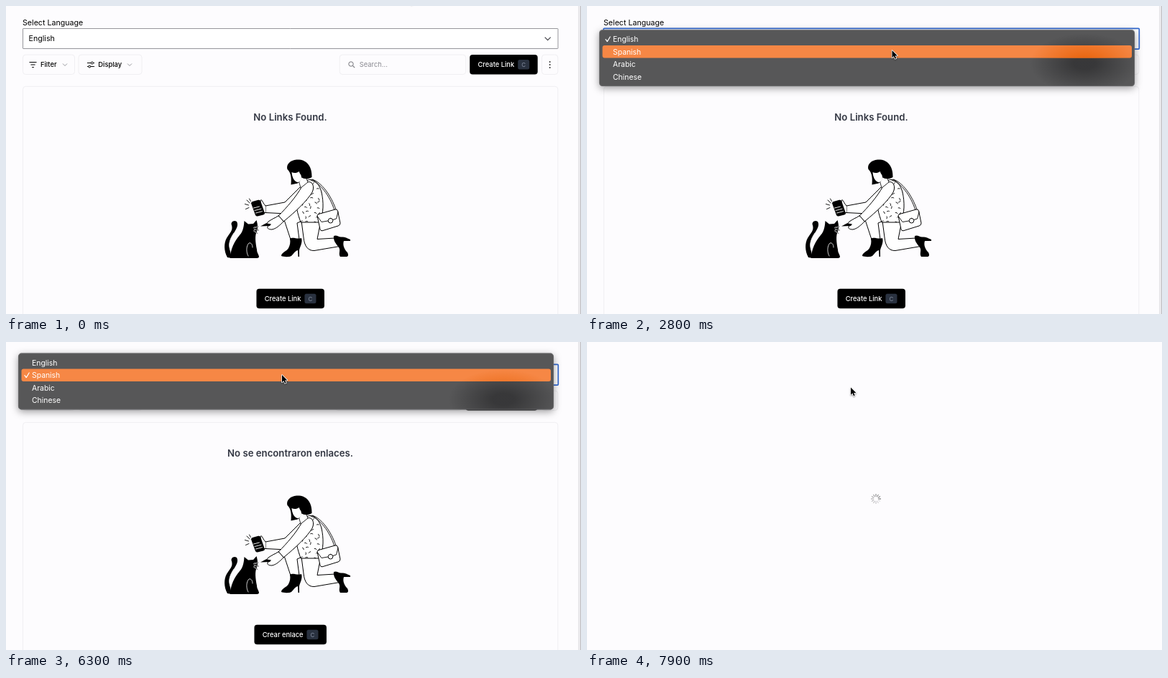
An HTML page with a canvas that plays this animation: 800 px wide and 430 px high, repeating every 8 s.

```html
<!DOCTYPE html>
<html lang="en">
<head>
<meta charset="utf-8">
<title>Language select</title>
<style>
  html, body { margin: 0; width: 100%; height: 100%; overflow: hidden; background: #fdfcfe; }
  canvas { display: block; width: 800px; height: 430px; }
</style>
</head>
<body>
<canvas id="stage"></canvas>
<script>
const LOOP = 8000, STEP = 100, W = 800, H = 430;
const BG = '#fdfcfe', INK = '#000', FAINT = '#f0eff2';
const ROW = 17.6;
const LANGS = ['English', 'Spanish', 'Arabic', 'Chinese'];
const PAGES = [
  { label: 'Select Language', create: 'Create Link', empty: 'No Links Found.', btnW: 94.5 },
  { label: 'Seleccionar idioma', create: 'Crear enlace', empty: 'No se encontraron enlaces.', btnW: 100.5 }
];
// Pointer path: time, x, y
const PATH = [
  [600, 560, -14], [1000, 520, 22], [1400, 496.5, 42.5], [2300, 496.5, 42.5],
  [2700, 424.5, 62], [4100, 424.5, 62], [4300, 432, 70], [4600, 390, 190],
  [4900, 322, 266], [5000, 287.5, 240], [5300, 230, 160], [5800, 384, 46],
  [6400, 384, 46], [6700, 376, 59.5], [7200, 376, 59.5], [7600, 367, 63.5], [8000, 367, 63.5]
];
// What is on screen from each time onwards
const SCENES = [
  [0, { page: 0 }],
  [1500, { page: 0, focus: true }],
  [1700, { page: 0, focus: true, menu: 37.4 }],
  [3000, { page: 0, focus: true }],
  [3100, { loading: true }],
  [3400, { page: 1 }],
  [5900, { page: 1, focus: true }],
  [6000, { page: 1, focus: true, menu: 19.8 }],
  [7600, { page: 1, focus: true }],
  [7700, { loading: true }]
];

const canvas = document.getElementById('stage');
const ctx = canvas.getContext('2d');
const ratio = window.devicePixelRatio || 1;
canvas.width = W * ratio;
canvas.height = H * ratio;

function text(str, x, y, size, color = INK, weight = 400, align = 'left') {
  ctx.font = `${weight} ${size}px Inter, sans-serif`;
  ctx.textAlign = align;
  ctx.textBaseline = 'alphabetic';
  ctx.fillStyle = color;
  ctx.fillText(str, x, y);
}

function box(x, y, w, h, r, fill, stroke, lw = 1) {
  ctx.beginPath();
  ctx.roundRect(x, y, w, h, r);
  if (fill) { ctx.fillStyle = fill; ctx.fill(); }
  if (stroke) { ctx.strokeStyle = stroke; ctx.lineWidth = lw; ctx.stroke(); }
}

function shape(d, fill, stroke, lw = 1) {
  const p = new Path2D(d);
  if (fill) { ctx.fillStyle = fill; ctx.fill(p); }
  if (stroke) { ctx.strokeStyle = stroke; ctx.lineWidth = lw; ctx.stroke(p); }
  return p;
}

function chevron(x, y, r, color, lw) {
  shape(`M${x - r} ${y - r / 2}L${x} ${y + r / 2}L${x + r} ${y - r / 2}`, null, color, lw);
}

function dot(x, y, r, fill, stroke, lw) {
  box(x - r, y - r, 2 * r, 2 * r, r, fill, stroke, lw);
}

function createButton(x, y, w, label) {
  box(x, y, w, 27.5, 4, INK);
  text(label, x + 11.3, y + 17.1, 9.33, '#fff', 500);
  box(x + w - 27.5, y + 7, 16, 13.5, 2.5, '#2a3240');
  text('C', x + w - 19.5, y + 16.8, 8, '#8690a2', 400, 'center');
}

function toolbar(page) {
  box(23.5, 68, 72, 27.5, 4, BG, FAINT);
  shape('M32.5 78.5h10M34.5 82h6M36.2 85.5h2.6', null, INK, 1.1);
  text('Filter', 48, 85.2, 9.33, INK, 500);
  chevron(82, 82, 3, '#8c8c92', .9);

  box(101, 68, 88, 27.5, 4, BG, FAINT);
  shape('M113 79.5h10M113 84.5h10', null, INK, 1.1);
  dot(119.8, 79.5, 1.5, BG, INK, 1);
  dot(116.2, 84.5, 1.5, BG, INK, 1);
  text('Display', 128.3, 85.2, 9.33, INK, 500);
  chevron(172, 82, 3, '#8c8c92', .9);

  const btn = 739.7 - page.btnW, search = btn - 181;
  box(search, 68, 175.5, 27.5, 4, BG, FAINT);
  dot(search + 15.8, 81, 3.2, null, '#77777d', 1);
  shape(`M${search + 18.2} 83.4l2.8 2.8`, null, '#77777d', 1.1);
  text('Search...', search + 27.6, 85.2, 9.33, '#8a8a91');
  createButton(btn, 68, page.btnW, page.create);

  box(745.5, 68, 22.3, 27.5, 4, BG, FAINT);
  for (const y of [78, 82, 86]) dot(756.7, y, 1, '#333');
}

function cat() {
  shape('M308 351C303 342 303 331 307 324C312 316 316 313 314 306C312 302 317 298 321 301' +
    'C324 306 320 312 317 317C313 324 309 330 311 338L314 352Z', INK);
  shape('M312 352C312 340 318 328 325 320C330 315 331 307 331.5 300L337 304.5L344 304L348.5 299' +
    'C350 304 351 310 349 315C346 320 347 330 349 340C349 345 352 347 352 350.5C351 352.5 348 352 345 352Z', INK);
  shape('M317 317C312 324 309 332 312 341M337 349C334 344 334 335 338 331C341 330 343 333 343 337',
    null, '#fff', .8);
  shape('M345 309.5l6-1.5M345.5 312l6 1M345 314l5 3.5', null, '#fff', 1.5);
  shape('M345 309.5l6-1.5M345.5 312l6 1M345 314l5 3.5', null, INK, .7);
}

function flecks(vest) {
  let seed = 11;
  const rnd = () => (seed = seed * 16807 % 2147483647) / 2147483647;
  ctx.save();
  ctx.clip(vest);
  for (let row = 0; row < 9; row++) {
    for (let col = 0; col < 5; col++) {
      const x = 402 + col * 8.5 + (row % 2) * 4 + rnd() * 3, y = 246 + row * 6.6 + rnd() * 3;
      const a = rnd() * Math.PI, dx = Math.cos(a) * 3.2, dy = Math.sin(a) * 3.2;
      shape(`M${x} ${y}q${dx / 2 + 1} ${dy / 2 - 1} ${dx} ${dy}`, null, INK, .9);
    }
  }
  ctx.restore();
}

function woman() {
  // Kneeling leg, then the front leg
  shape('M411 300L414 323C415 335 420 342 429 341.5L464 335.5L458 324L433 325.5L438 300Z', '#fff', INK);
  shape('M404 280C394 281 385 286 385.5 294L396 326L408 326L405 303L412 300Z', '#fff', INK);
  shape('M456 321C460 319 463 323 467 322.5C471 322 474 324 479 326L479 328L470 328' +
    'C468 334 471 340 475 344C477 348 476 350 473 350L465 350C462 346 466 341 463 337C459 332 455 327 456 321Z', INK);
  shape('M395 325C399 322 405 326 411 324C413 330 409 336 408 341L408 350L406.5 350L406 341' +
    'C402 342 400 346 397 349C393 351 386 350 383 349C383 344 390 343 393 338C395 334 396 330 395 325Z', INK);

  // Far arm with phone
  shape('M410 252L388 274L361 279L361 288.5L390 290L412 276Z', '#fff', INK);
  shape('M361 279C358 276 357 272 355 270.5C353 272 355 277 354 281C353 286 355 290 361 288.5', '#fff', INK);
  shape('M343 273L351 270.8Q353 270.6 354 272L360 289Q360 291 358 291.6L350 293.5Q348 293.6 347 292L341 275.5Q341 273.8 343 273Z', INK);
  shape('M344.5 282l8-2M346 285.5l9-2.3M347.5 289l9-2.3', null, '#fff', .9);
  shape('M335 271l4 4M332.5 276.5l5 1.5M333.5 283.5l4.5-2M338.5 269l2 3.5', null, INK, .9);

  const vest = shape('M420 243C429 240 436 249 439 260C442 274 442 288 437 302L410 302C406 290 402 279 405 266Z', '#fff', INK);
  flecks(vest);

  // Near arm
  shape('M419 246C426 243 430 252 426 260C418 273 404 286 386 301L379 293C391 281 404 266 411 253Z', '#fff', INK);
  shape('M379 293C374 296 369 298 365 301L361 306L365 307C362 310 365 312 370 312C376 311 381 306 386 301Z', '#fff', INK);
  shape('M354 307.5L362 303.2L369 304.5L367 307Z', INK);

  // Neck and head
  shape('M407 243L410 254L420 246L416 236Z', '#fff', INK, .8);
  shape('M391.5 228C389 219 399 213.5 408 214.5C420 215.5 426 226 425.5 239C420 242.5 414 241.5 411 239' +
    'C410 244 408 247.5 403.5 248L396.5 249.5C397 242 397.5 234 391.5 228Z', INK);
  shape('M397.5 232C401 234 405 233 408 231C408 234 411 235 411 239C411 244 408 246.5 405 246C400 244 398 238 397.5 232Z', '#fff');

  // Bag
  shape('M424 243C437 247 450 264 457 285M426 242C439 246 452 264 459 284', null, INK, .9);
  shape('M435 290.5L458 284Q461 283.5 461.5 286L465 303Q465.2 306 462 307L440 313.8Q437.5 314 437 311.5L433 293Q433 291 435 290.5Z', '#fff', INK);
  shape('M433.5 294L439 301.5L448 300M462 287.5L459.5 297L455 298.5', null, INK, .9);
  dot(451.5, 299.7, 3.3, '#fff', INK, 1);
}

function page(lang, focus) {
  const p = PAGES[lang];
  text(p.label, 23, 27.3, 10.67);
  box(23.5, 31.5, 744.5, 28, .5, '#fff', focus ? null : '#96969b');
  if (focus) box(23, 31.4, 745.3, 28.7, 1, null, '#3268cf', 1.7);
  text(LANGS[lang], 31.5, 49.3, 10.67);
  chevron(753.7, 45.6, 4, '#44444a', 1.2);
  toolbar(p);
  box(23.5, 112.3, 744.3, 400, 4, null, FAINT);
  text(p.empty, 395.5, 159.6, 13.2, '#333743', 600, 'center');
  ctx.lineJoin = ctx.lineCap = 'round';
  cat();
  woman();
  createButton(395.7 - p.btnW / 2, 394.8, p.btnW, p.create);
  ctx.fillStyle = '#f5f4f6';
  ctx.fillRect(796, 0, 4, H);
  ctx.fillStyle = '#dedde0';
  ctx.fillRect(796, 0, .8, H);
  ctx.fillStyle = '#c6c5c9';
  ctx.fillRect(798.5, 0, 1.5, H);
}

// Soft patch where the black button shines through the menu
function shade(color, alpha) {
  ctx.save();
  ctx.translate(692, 80);
  ctx.scale(1, .55);
  const g = ctx.createRadialGradient(0, 0, 15, 0, 0, 76);
  g.addColorStop(0, `rgba(${color},${alpha})`);
  g.addColorStop(1, `rgba(${color},0)`);
  ctx.fillStyle = g;
  ctx.fillRect(-80, -90, 160, 180);
  ctx.restore();
}

function menu(top, checked, hover) {
  const y = top - 4.2;
  ctx.save();
  ctx.shadowColor = `rgba(0,0,0,.38)`;
  ctx.shadowBlur = 11 * ratio;
  ctx.shadowOffsetY = 3 * ratio;
  box(17, y, 745, 78.8, 4.5, '#575758');
  ctx.restore();
  ctx.save();
  ctx.clip();
  shade('25,25,27', .5);
  ctx.restore();
  box(17.3, y + .3, 744.4, 78.2, 4.5, null, 'rgba(130,130,132,.7)', .7);

  ctx.save();
  box(21.5, top + hover * ROW, 736.5, ROW, 3, '#f68745');
  ctx.clip();
  shade('232,98,10', .85);
  ctx.restore();
  LANGS.forEach((name, i) => {
    const base = top + i * ROW + 12.7;
    text(name, 36, base, 10.4, '#fff');
    if (i === checked) shape(`M26 ${base - 3.5}l2.2 3l4-6.6`, null, '#fff', 1.2);
  });
}

function spinner(t) {
  const lead = Math.floor(t / 100) % 12 + 5;
  ctx.lineCap = 'round';
  for (let i = 0; i < 12; i++) {
    const a = i * Math.PI / 6, c = Math.cos(a), s = Math.sin(a);
    const age = (lead - i + 24) % 12;
    shape(`M${402 + 3.6 * c} ${219 + 3.6 * s}L${402 + 6.6 * c} ${219 + 6.6 * s}`,
      null, `rgba(50,50,52,${.8 - age * .055})`, 1);
  }
}

function pointerAt(t) {
  if (t < PATH[0][0]) return [PATH[0][1], PATH[0][2]];
  const i = PATH.findIndex(p => p[0] > t);
  const [t0, x0, y0] = PATH[i - 1], [t1, x1, y1] = PATH[i];
  const k = (t - t0) / (t1 - t0);
  return [x0 + (x1 - x0) * k, y0 + (y1 - y0) * k];
}

function pointer(x, y) {
  ctx.save();
  ctx.translate(x, y);
  ctx.lineJoin = 'round';
  ctx.shadowColor = 'rgba(0,0,0,.35)';
  ctx.shadowBlur = 2 * ratio;
  ctx.shadowOffsetY = ratio;
  const d = 'M0 0V10.2L2.4 8L4 11.7L5.7 11L4.1 7.4H7.4Z';
  shape(d, '#fff', '#fff', 1.6);
  ctx.shadowColor = 'transparent';
  shape(d, INK);
  ctx.restore();
}

function draw(t) {
  ctx.setTransform(ratio, 0, 0, ratio, 0, 0);
  ctx.fillStyle = BG;
  ctx.fillRect(0, 0, W, H);
  ctx.lineCap = 'butt';
  ctx.lineJoin = 'miter';
  const scene = SCENES.filter(s => s[0] <= t).pop()[1];
  const [x, y] = pointerAt(t);
  if (scene.loading) {
    spinner(t);
  } else {
    page(scene.page, scene.focus);
    if (scene.menu) menu(scene.menu, scene.page, Math.floor((y - scene.menu) / ROW));
  }
  pointer(x, y);
}

const start = performance.now();
function tick() {
  const t = (performance.now() - start) % LOOP;
  draw(Math.floor(t / STEP) * STEP);
  requestAnimationFrame(tick);
}
tick();
</script>
</body>
</html>
```
